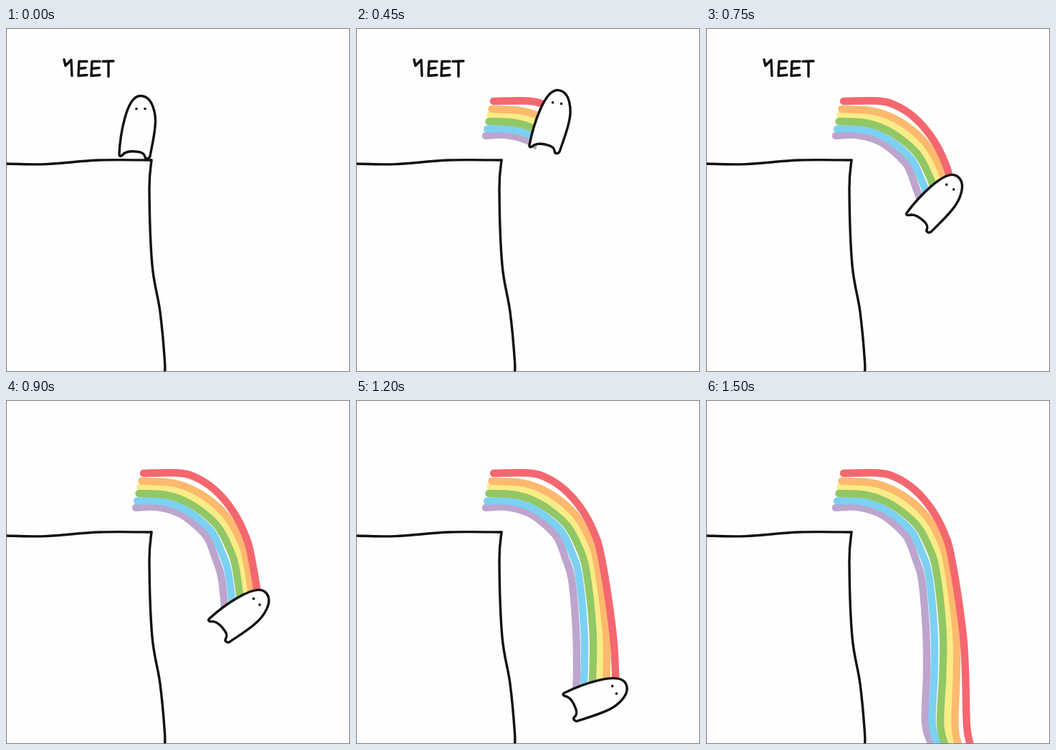
An HTML page for the animation above (2.1 s loop, 480 by 479 pixels).

```html
<!DOCTYPE html>
<html lang="en">
<head>
<meta charset="utf-8">
<title>Yeet</title>
<style>
  html, body { margin: 0; width: 100%; height: 100%; overflow: hidden; background: #fefefe; }
  svg { display: block; width: 100%; height: 100%; }
  .ink { fill: none; stroke: #111; stroke-width: 3.4; stroke-linecap: round; stroke-linejoin: round; }
  #bands path { fill: none; stroke-width: 10.4; stroke-linecap: round; }
</style>
</head>
<body>
<svg viewBox="0 0 480 479" preserveAspectRatio="none">
  <defs>
    <clipPath id="behind"><rect id="cut" x="-900" y="-900" width="890" height="1800"/></clipPath>
  </defs>
  <rect width="480" height="479" fill="#fefefe"/>
  <g class="ink" id="cliff"></g>
  <g class="ink" id="word" role="img" aria-label="YEET" transform="translate(0 .5)">
    <path d="M81 43.5L83 52L91 44M91 44L92 66"/>
    <path d="M102 46L101 66M102 46L113 46M102 56L111 55M101 66L113 65"/>
    <path d="M120 46L119 66M120 46L131 46M120 56L130 55M119 66L131 65"/>
    <path d="M135 46L150 45.5M143 46L143 67"/>
  </g>
  <g id="bands"></g>
  <g id="ghost">
    <path class="ink" style="fill:#fefefe" d="M-25 30C-24 8 -16 -51 4.5 -51C22 -51 27 -25 25 -8C24 5 20 22 18 33C17 37 12 38 11 34C10 30 8 28 2 27C-4 26 -12 25 -18 29C-22 33 -25 35 -25 30Z"/>
    <circle cx="-1" cy="-33" r="1.8" fill="#111"/>
    <circle cx="11" cy="-33" r="1.8" fill="#111"/>
  </g>
  <rect x=".5" y=".5" width="479" height="478" fill="none" stroke="#7c7c7c"/>
</svg>
<script>
const STEP = 150, LOOP = 2100;
const WORD_END = 6, TRAIL_START = 2, GHOST_END = 10;   // in steps
const $ = id => document.getElementById(id);
const mix = (a, b, f) => a.map((v, k) => v + (b[k] - v) * f);

// Key poses of the jump: step, x, y, rotation
const jump = [
  [0, 183, 145.5, 0], [2, 228, 122.5, 0], [3, 271, 136.5, 8], [4, 294.7, 171.5, 17],
  [5, 318, 246, 34], [7, 327.7, 355.3, 56], [9, 331, 475, 66]
];

function poseAt(step) {
  const n = jump.findIndex(key => key[0] >= step);
  if (!n) return jump[0];
  const a = jump[n - 1], b = jump[n];
  return mix(a, b, (step - a[0]) / (b[0] - a[0]));
}

const points = text => text.split(' ').map(s => s.split(',').map(Number));

const cliff = [
  '0,189 55,189.6 130,184 203,184',
  '203,184 200,225 204,330 215,395 221.6,465 221,482'
];

// Edges of the rainbow; every band runs between them
const outer = points('192,102 238,101.5 263,107 290,124 314,151 332,184 343,222 358,320 362,380 364,455 370,485');
const inner = points('181,150 210,149 240,157 262,172 281,192 292,220 301,250 307,320 308,380 306,450 317,485');
const bands = [
  ['#f8ec87', .37], ['#fdb96e', .2], ['#f4676f', 0],
  ['#bda5cd', 1], ['#7cd0f2', .79], ['#92c766', .56]
];

// The bands spread unevenly, in a slow wave along the rainbow
const spread = i => .92 - .2 * Math.cos((i - 2) * Math.PI / 4);
const band = f => outer.map((p, i) => mix(p, inner[i], f ** spread(i)));

// Smooth curve through the points
function curve(p) {
  const at = i => p[Math.max(0, Math.min(p.length - 1, i))];
  let d = 'M' + p[0];
  for (let i = 0; i < p.length - 1; i++) {
    const [a, b, c, e] = [at(i - 1), at(i), at(i + 1), at(i + 2)];
    const c1 = b.map((v, k) => v + (c[k] - a[k]) / 6);
    const c2 = c.map((v, k) => v - (e[k] - b[k]) / 6);
    d += `C${c1} ${c2} ${c}`;
  }
  return d;
}

function addCurve(parent, pts, color) {
  const path = document.createElementNS('http://www.w3.org/2000/svg', 'path');
  path.setAttribute('d', curve(pts));
  if (color) path.setAttribute('stroke', color);
  parent.append(path);
}

const show = (id, on) => { $(id).style.display = on ? '' : 'none'; };

function draw(t) {
  const step = Math.floor(t / STEP), flying = step < GHOST_END;
  show('word', step < WORD_END);
  show('ghost', flying);
  show('bands', step >= TRAIL_START);
  $('bands').setAttribute('clip-path', flying ? 'url(#behind)' : 'none');
  if (!flying) return;
  const [, x, y, turn] = poseAt(step);
  const place = (id, angle) =>
    $(id).setAttribute('transform', `translate(${x} ${y}) rotate(${angle})`);
  place('ghost', turn);
  place('cut', turn + 8);   // the body leans a little
}

cliff.forEach(c => addCurve($('cliff'), points(c)));
bands.forEach(([color, f]) => addCurve($('bands'), band(f), color));

const start = performance.now();
function tick() {
  draw((performance.now() - start) % LOOP);
  requestAnimationFrame(tick);
}
tick();
</script>
</body>
</html>
```
